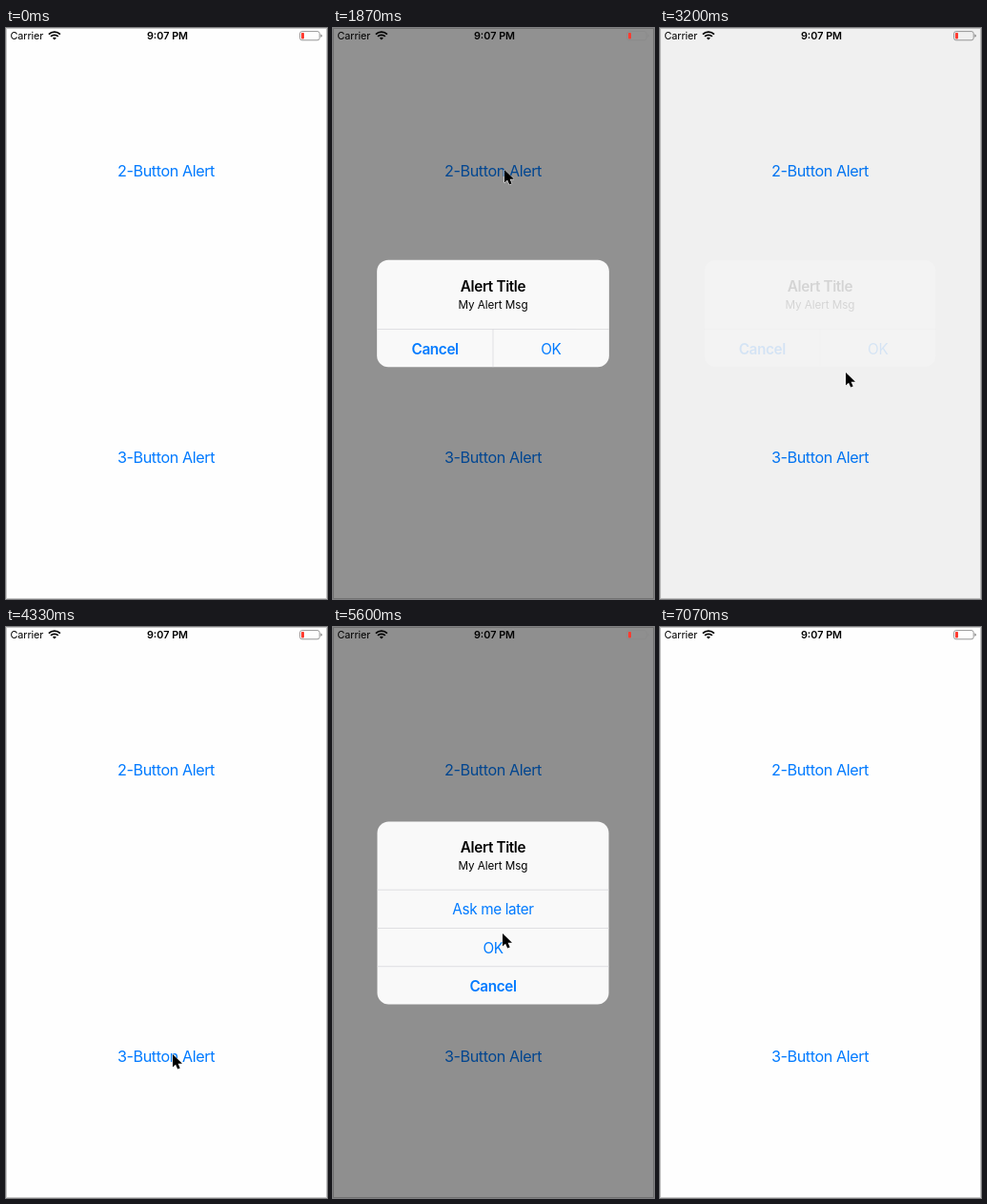
Animation, 337 px wide and 600 px high, one loop 7.87 s. Source, as an HTML page:

```html
<!DOCTYPE html>
<html lang="en">
<head>
<meta charset="utf-8">
<title>Alerts</title>
<style>
  html, body { margin: 0; width: 337px; height: 600px; overflow: hidden; background: #fefefe; }
  svg { display: block; }
  text { font-family: Inter, "Open Sans", sans-serif; text-anchor: middle; }
  .link { font-size: 16.2px; letter-spacing: -.43px; fill: #007aff; }
  .title, .btn { font-size: 15.3px; letter-spacing: -.37px; }
  .msg { font-size: 11.7px; letter-spacing: -.07px; }
  .btn { fill: #007aff; }
  .bold { font-weight: 600; }
  .status { font-size: 10.8px; }
  .rule { stroke: #d9d9dc; stroke-width: .8; fill: none; }
</style>
</head>
<body>
<svg width="337" height="600" viewBox="0 0 337 600">
  <rect width="337" height="600" fill="#fefefe"/>
  <text id="link2" class="link" x="168" y="155.8">2-Button Alert</text>
  <text id="link3" class="link" x="168" y="456.8">3-Button Alert</text>
  <rect x=".5" y=".5" width="336" height="599" fill="none" stroke="#c9c9c9"/>
  <rect id="dim" width="337" height="600"/>

  <g class="status">
    <text x="4.5" y="12.3" style="text-anchor:start;letter-spacing:-.08px">Carrier</text>
    <text x="169.5" y="12.3" class="bold">9:07 PM</text>
    <g fill="none" stroke="#000" stroke-width="1.8">
      <path d="M44.9 6.6a8.6 8.6 0 0 1 12 0M47 8.9a5.6 5.6 0 0 1 7.8 0"/>
      <path d="M50.9 12.6L48.9 10.6a2.9 2.9 0 0 1 4 0Z" fill="#000" stroke="none"/>
    </g>
    <rect x="308.6" y="3.6" width="20.6" height="9.2" rx="2.2" fill="none" stroke="#8c8c8c" stroke-width=".9"/>
    <rect x="310" y="5" width="3" height="6.4" rx=".8" fill="#ff3b30"/>
    <path d="M330.3 6.6q1.6 .4 1.6 1.6t-1.6 1.6Z" fill="#8c8c8c"/>
  </g>

  <g id="alert2">
    <rect class="panel" x="46.5" y="244" width="243" height="112" rx="12" fill="#f9f9f9"/>
    <g class="body">
      <path class="rule" d="M46.5 316.5h243M168 316.5v39.5"/>
      <text class="title bold" x="168" y="276.7">Alert Title</text>
      <text class="msg" x="168" y="295">My Alert Msg</text>
      <text class="btn bold" x="107.3" y="342.5">Cancel</text>
      <text class="btn" x="228.7" y="342.5">OK</text>
    </g>
  </g>

  <g id="alert3">
    <rect class="panel" x="46.5" y="204.5" width="243" height="192" rx="12" fill="#f9f9f9"/>
    <g class="body">
      <path class="rule" d="M46.5 276.2h243m-243 40.3h243m-243 40.2h243"/>
      <text class="title bold" x="168" y="236.7">Alert Title</text>
      <text class="msg" x="168" y="255">My Alert Msg</text>
      <text class="btn" x="168" y="302.2">Ask me later</text>
      <text class="btn" x="168" y="342.5">OK</text>
      <text class="btn bold" x="168" y="382.6">Cancel</text>
    </g>
  </g>

  <path id="cursor" d="M0 0V13.6L3.1 10.8 5.2 15.6 7.7 14.5 5.6 9.8H10Z" stroke="#fff" stroke-width="1" paint-order="stroke"/>
</svg>
<script>
const LOOP = 7870, STEP = 200 / 3;
const $ = id => document.getElementById(id);
const clamp = x => Math.max(0, Math.min(1, x));

// Pointer stops: time, x, y
const path = [
  [930, 30, -20], [1130, 128, 170], [1330, 186, 182], [1470, 190, 158],
  [1670, 180, 149], [1870, 180, 149], [2470, 213, 332], [2990, 213, 332],
  [3200, 195, 362], [3600, 178, 449], [4000, 178, 449], [4070, 175, 449],
  [5070, 175, 449], [5400, 178, 322], [5600, 178, 322], [5670, 180, 324],
  [6500, 180, 324], [7000, 345, 430]
];

// What is left of a critically damped spring
function left(t) {
  const w = Math.max(0, t) * .01826;
  return (1 + w) * Math.exp(-w);
}

function pointer(t) {
  const i = path.findIndex(p => p[0] > t);
  if (i < 1) return [-50, -50];
  const [t0, x0, y0] = path[i - 1], [t1, x1, y1] = path[i];
  const u = (t - t0) / (t1 - t0), e = u * u * (3 - 2 * u);
  return [x0 + (x1 - x0) * e, y0 + (y1 - y0) * e];
}

function alertBox(n, t, show, hide) {
  const box = $("alert" + n), rest = left(t - show);
  const a = (1 - rest) * left(t - hide);
  const scale = 1 + .2 * rest;
  box.setAttribute("transform", `translate(168 300.3) scale(${scale}) translate(-168 -300.3)`);
  box.querySelector(".panel").style.opacity = 1 - (1 - a) ** 2;
  box.querySelector(".body").style.opacity = a;
  $("link" + n).style.opacity =
    t < show - 100 ? 1 : .2 + .8 * clamp((t - show) / 300);
  return a;
}

function draw(now) {
  const t = Math.floor(now % LOOP / STEP + .01) * STEP;
  const a = Math.max(alertBox(2, t, 1530, 3000), alertBox(3, t, 4436, 6395));
  $("dim").style.opacity = .44 * a;
  $("cursor").setAttribute("transform", `translate(${pointer(t)})`);
}

const start = performance.now();
function tick() {
  draw(performance.now() - start);
  requestAnimationFrame(tick);
}
tick();
</script>
</body>
</html>
```
